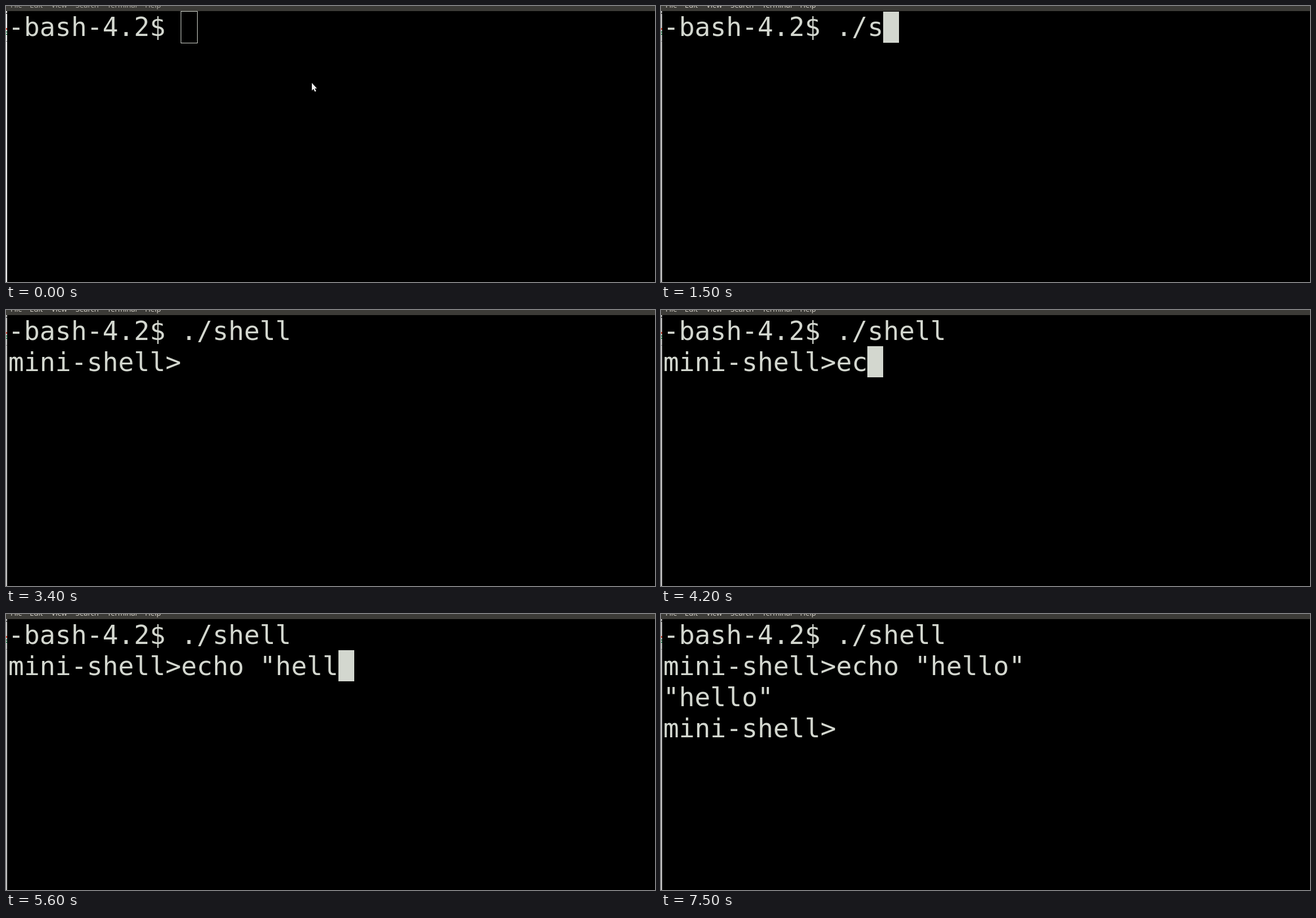
Recreate the animation shown at these times as an HTML page with a canvas. Size 1148 by 488 pixels, loop 8 s.

```html
<!DOCTYPE html>
<html lang="en">
<head>
<meta charset="utf-8">
<title>Terminal session</title>
<style>
  html, body { margin: 0; width: 100%; height: 100%; overflow: hidden; background: #000; }
  canvas { display: block; }
</style>
</head>
<body>
<canvas id="stage" width="1148" height="488"></canvas>
<script>
const ctx = document.getElementById('stage').getContext('2d');
const LOOP = 8000, LEFT = 3.9, TOP = 9.8, CELL_W = 27.83, CELL_H = 54.8;
const INK = '#d3d7cf';
const FOCUS_TIME = 600, POINTER_HIDE = 1100;

const MENU = [['File', 8], ['Edit', 42], ['View', 80], ['Search', 123], ['Terminal', 179], ['Help', 246]];

// [time, text appended to the screen]
const OUTPUT = [
  [0, '-bash-4.2$ '], [1200, './'], [1500, 's'], [1700, 'hell '],
  [2800, '\nmini-shell>'],
  [4100, 'e'], [4200, 'c'], [4300, 'h'], [4400, 'o'], [4500, ' '],
  [5000, '"'], [5200, 'h'], [5400, 'e'], [5500, 'l'], [5600, 'l'], [5700, 'o'], [6000, '"'],
  [6900, '\n"hello"\nmini-shell>']
];

// Spans in which the blinking cursor is off
const CURSOR_OFF = [[2400, 2700], [3400, 4000], [6600, 6700], [7500, LOOP]];

function rect(color, x, y, w, h) {
  ctx.fillStyle = color;
  ctx.fillRect(x, y, w, h);
}

function drawWindow(focused) {
  rect('#000', 0, 0, 1148, 488);
  rect('#3c3b37', 0, 0, 1148, 9);
  ctx.font = '13px "Open Sans", "Noto Sans", sans-serif';
  ctx.fillStyle = focused ? '#dfdbd2' : '#b5b2aa';
  for (const [label, x] of MENU) ctx.fillText(label, x, 3);

  // Sliver of the page behind the window
  rect(focused ? '#c4c4c4' : '#f0f0f0', 0, 9, 2, 479);
  rect('#555', 0, 12, 2, 2);
  rect('#c8442f', 0, 39, 2, 3);
  rect('#2f8a58', 0, 45, 2, 2);
  rect('#2f8a58', 0, 49, 2, 2);
  rect('#888', 0, 62, 2, 1);
}

function drawTerminal(t, focused) {
  const lines = OUTPUT.filter(([time]) => time <= t).map(([, text]) => text).join('').split('\n');
  ctx.font = '46.2px "DejaVu Sans Mono", monospace';
  ctx.fillStyle = INK;
  lines.forEach((line, row) => ctx.fillText(line, LEFT, 53.4 + row * CELL_H));

  const row = lines.length - 1;
  // Completing the program name also adds a trailing blank
  const col = lines[row].length + (row === 0 && t >= 1700 ? 1 : 0);
  const x = Math.floor(LEFT + col * CELL_W + 0.3);
  const y = Math.floor(TOP + row * CELL_H + 0.3);
  if (!focused) {
    ctx.strokeStyle = INK;
    ctx.lineWidth = 1;
    ctx.strokeRect(x - 0.5, y - 0.5, 29, 56);
  } else if (!CURSOR_OFF.some(([from, to]) => t >= from && t < to)) {
    rect(INK, x, y, 28, 55);
  }
}

function drawArrow(x, y) {
  const shape = new Path2D('M0 0V13.5L3 10.7L5.3 15.6L7.6 14.6L5.3 9.8H9Z');
  ctx.save();
  ctx.translate(x, y);
  ctx.fillStyle = '#eee';
  ctx.fill(shape);
  ctx.restore();
}

function drawBeam(x, y) {
  rect('#ddd', x, y, 2, 1);
  rect('#ddd', x + 4, y, 2, 1);
  rect('#ddd', x + 2, y + 1, 2, 14);
  rect('#ddd', x, y + 15, 2, 1);
  rect('#ddd', x + 4, y + 15, 2, 1);
}

function drawPointer(t) {
  if (t < 100) drawArrow(541, 136);
  else if (t < 500) drawBeam(540, 130);
  else if (t < POINTER_HIDE) drawBeam(538, 122);
}

const start = performance.now();
function frame() {
  const t = (performance.now() - start) % LOOP;
  const focused = t >= FOCUS_TIME;
  drawWindow(focused);
  drawTerminal(t, focused);
  drawPointer(t);
  requestAnimationFrame(frame);
}
frame();
</script>
</body>
</html>
```
